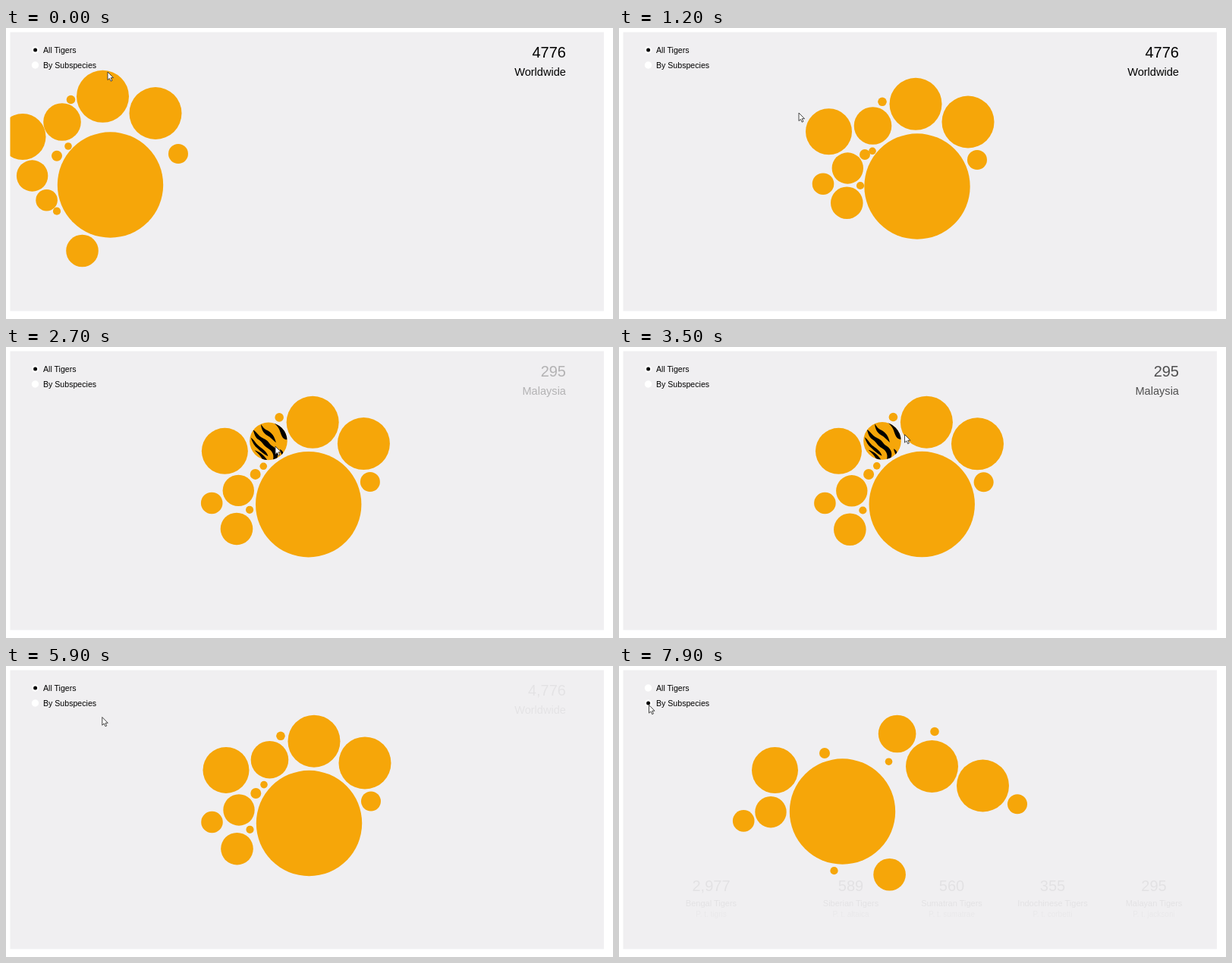
Write an HTML page that moves like this. It is 800 by 384 pixels and loops after 8 s.

```html
<!DOCTYPE html>
<html lang="en">
<head>
<meta charset="utf-8">
<title>Tigers</title>
<style>
  html, body { margin: 0; width: 100%; height: 100%; overflow: hidden; background: #fff; }
  svg { display: block; width: 800px; height: 384px; font-family: "Liberation Sans", Arial, sans-serif; fill: #000; }
  .option { font-size: 10.6px; }
  .count { font-size: 20px; }
  .place { font-size: 14.6px; }
  .kind { font-size: 11px; }
  .latin { font-size: 10px; fill: #777; }
  .end { text-anchor: end; }
  .mid { text-anchor: middle; }
</style>
</head>
<body>
<svg id="stage" viewBox="0 0 800 384">
  <defs>
    <clipPath id="panel"><rect x="5.5" y="5.5" width="782.5" height="368"/></clipPath>
    <clipPath id="round"><circle cx="50" cy="50" r="50"/></clipPath>
  </defs>
  <rect x="5.5" y="5.5" width="782.5" height="368" fill="#f0eff1"/>
  <g fill="#fff"><circle cx="38.5" cy="29" r="4.7"/><circle cx="38.5" cy="49" r="4.7"/></g>
  <circle id="dot" cx="38.6" cy="29" r="2.5"/>
  <text class="option" x="49" y="33">All Tigers</text>
  <text class="option" x="49" y="53">By Subspecies</text>
  <g id="totals"></g>
  <g id="kinds"></g>
  <g clip-path="url(#panel)"><g id="bubbles" fill="#f6a609"></g></g>
  <g id="stripes"><g clip-path="url(#round)">
    <path d="M62 0C75 8 79 18 83 30C87 42 93 46 100 46V0Z"/>
    <path d="M30 5C36 12 37 17 47 21C59 27 67 38 70 54C61 46 56 39 46 34C36 28 31 18 30 5Z"/>
    <path d="M9 20C20 25 23 37 36 42C51 48 51 57 62 64C74 72 79 86 71 100H62C66 86 60 76 50 70C36 62 34 52 24 46C14 40 13 30 9 20Z"/>
    <path d="M3 40C12 46 16 56 26 64C36 72 46 78 49 90C37 85 30 77 22 70C12 62 7 52 3 40Z"/>
    <path d="M13 74C26 78 37 86 47 100H35C30 89 22 82 13 74Z"/>
    <path d="M80 71C87 75 92 80 88 90C84 85 82 78 80 71Z"/>
  </g></g>
  <path id="cursor" d="M0 0V10.6L2.4 8.4L4.2 12.2L5.9 11.4L4.2 7.7H7.5Z" fill="#fff" stroke="#333" stroke-width=".9"/>
</svg>
<script>
const LOOP = 8000, STEP = 100;
const $ = id => document.getElementById(id);

function add(parent, tag, attrs, text) {
  const el = document.createElementNS("http://www.w3.org/2000/svg", tag);
  for (const k in attrs) el.setAttribute(k, attrs[k]);
  if (text) el.textContent = text;
  return parent.appendChild(el);
}

// radius, then x,y: entering, gathered, settled, splitting, split
const bubbles = [
  [69.7, 137.5, 207, 393, 209, 399.5, 207.5, 391, 207, 294.5, 192],
  [34.5, 127.5, 90.3, 391, 100.3, 406, 99.2, 406.5, 99.5, 412.5, 132.5],
  [34.5, 197, 112.5, 460, 124, 473, 128, 472.5, 130, 479.5, 158],
  [13, 227, 166, 472, 174, 481, 178.5, 485, 179.8, 525, 182.3],
  [30.5, 22, 143.5, 276.5, 136.7, 290, 137.4, 282.7, 137.4, 205.5, 137.5],
  [24.8, 74, 124, 334.5, 129, 347.5, 123.7, 346.3, 119, 366.6, 89.5],
  [5.8, 85.5, 94.5, 347, 97.3, 362, 92.3, 363.2, 89, 416, 86.5],
  [7, 67, 168.7, 324, 167, 329.3, 168, 322.4, 164.6, 271, 115],
  [4.8, 82, 156, 334, 162.3, 340, 156.6, 336.8, 150.7, 355.5, 126.2],
  [20.7, 34.6, 195, 301.3, 185, 307, 190, 298.3, 190, 200, 192.7],
  [14.3, 53.6, 227.2, 269, 205.7, 271.5, 206, 262.8, 206, 164.2, 204.4],
  [5.1, 67, 241.7, 318, 208, 321.5, 215.8, 313, 215.5, 283.5, 270.2],
  [21.3, 100.5, 294, 300.3, 230.8, 304.5, 241.2, 303.5, 244, 356.6, 275.2]
].map(([r, ...xy]) => ({ r, xy, el: add($("bubbles"), "circle", { r }) }));

// count, place, fade in from/to, fade out from/to
const totals = [
  ["4776", "Worldwide", -2, -1, 1700, 2200],
  ["295", "Malaysia", 2600, 3000, 3400, 3700],
  ["562", "Russia", 3700, 4100, 4450, 4950],
  ["4,776", "Worldwide", 5880, 6300, 7050, 7550]
].map(([count, place, ...fade]) => {
  const el = add($("totals"), "g", {});
  add(el, "text", { class: "count end", x: 738, y: 39 }, count);
  add(el, "text", { class: "place end", x: 738, y: 62.5 }, place);
  return { el, fade };
});

[
  [121.5, "2,977", "Bengal Tigers", "P. t. tigris"],
  [305.5, "589", "Siberian Tigers", "P. t. altaica"],
  [438.5, "560", "Sumatran Tigers", "P. t. sumatrae"],
  [571.5, "355", "Indochinese Tigers", "P. t. corbetti"],
  [705, "295", "Malayan Tigers", "P. t. jacksoni"]
].forEach(([x, ...lines]) => lines.forEach((line, i) =>
  add($("kinds"), "text", { class: ["count", "kind", "latin"][i] + " mid", x, y: [297, 317, 331][i] }, line)));

// time, x, y of the pointer tip
const route = [
  [0, 134, 58], [1200, 237, 112], [2600, 355, 131], [3300, 355, 131], [3700, 398, 100],
  [4300, 410, 105], [4500, 424.5, 139], [5900, 126.8, 67.5], [6700, 39.5, 51.5], [LOOP, 39.5, 51.5]
];

const mix = (a, b, u) => a + (b - a) * u;
const ramp = (t, a, b) => Math.min(1, Math.max(0, (t - a) / (b - a)));

function tip(t) {
  let i = 1;
  while (i < route.length - 1 && t > route[i][0]) i++;
  const [a, b] = [route[i - 1], route[i]], u = ramp(t, a[0], b[0]);
  return [mix(a[1], b[1], u), mix(a[2], b[2], u)];
}

// index of the starting pose and progress towards the next one
function phase(t) {
  if (t < 1200) return [0, (1 - Math.exp(-t / 333)) / (1 - Math.exp(-3.6))];
  if (t < 7000) return [1, 1 - Math.exp(-(t - 1200) / 714)];
  return t < 7100 ? [2, ramp(t, 7000, 7100)] : [3, ramp(t, 7100, 7900)];
}

function draw(t) {
  const [p, u] = phase(t), [hx, hy] = tip(t - STEP);
  let hit = null;
  for (const b of bubbles) {
    const q = b.xy.slice(2 * p, 2 * p + 4);
    const x = mix(q[0], q[2], u), y = mix(q[1], q[3], u);
    b.el.setAttribute("cx", x);
    b.el.setAttribute("cy", y);
    if (t > 1300 && t < 7000 && Math.hypot(hx - x, hy - y) < b.r) hit = [x - b.r, y - b.r, b.r / 50];
  }
  $("stripes").setAttribute("display", hit ? "inline" : "none");
  if (hit) $("stripes").setAttribute("transform", `translate(${hit[0]} ${hit[1]}) scale(${hit[2]})`);

  for (const { el, fade: [a, b, c, d] } of totals) el.setAttribute("opacity", ramp(t, a, b) - ramp(t, c, d));
  $("kinds").setAttribute("opacity", 0.05 * ramp(t, 7700, 7900));
  $("dot").setAttribute("cy", t < 7000 ? 29 : 49);
  $("cursor").setAttribute("transform", `translate(${tip(t)})`);
}

const start = performance.now();
function tick(now) {
  const t = Math.max(0, now - start) % LOOP;
  draw(Math.floor(t / STEP) * STEP);
  requestAnimationFrame(tick);
}
draw(0);
requestAnimationFrame(tick);
</script>
</body>
</html>
```
